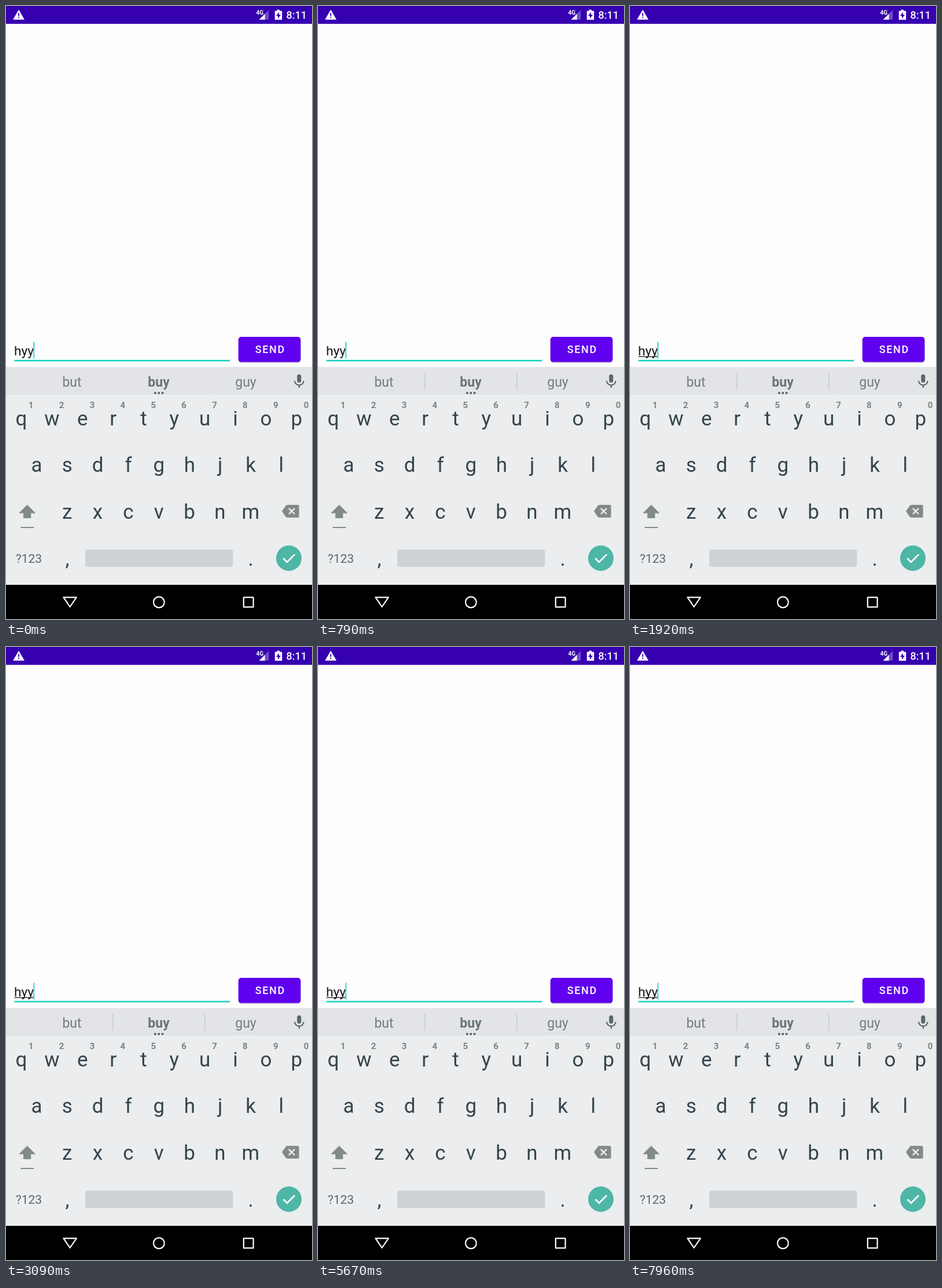
These frames come from a looping animation (529x1058 px, 8 s). An HTML page:

```html
<!DOCTYPE html>
<html lang="en">
<head>
<meta charset="utf-8">
<title>Message input</title>
<style>
  html, body { margin: 0; width: 100%; height: 100%; overflow: hidden; background: #fdfdfd; }
  svg { display: block; width: 100vw; height: 100vh; font-family: Roboto, sans-serif; }
  .key { font-size: 35px; fill: #34444c; text-anchor: middle; }
  .hint { font-size: 15px; font-weight: 700; fill: #7a8383; text-anchor: middle; }
  .word { font-size: 23px; fill: #717b7f; text-anchor: middle; }
  .word.best { font-weight: 700; fill: #69747a; }
  .nav { fill: none; stroke: #fff; stroke-width: 2.2; stroke-linejoin: round; }
  .composing { animation: compose 8s step-end infinite; }
  .dividers { animation: settle 8s step-end infinite; }
  @keyframes compose { 0% { opacity: 0; } 14.625%, 100% { opacity: 1; } }
  @keyframes settle { 0% { opacity: .12; } .5%, 100% { opacity: 1; } }
</style>
</head>
<body>
<svg viewBox="0 0 529 1058">
  <rect width="529" height="1058" fill="#fdfdfd"/>

  <!-- status bar -->
  <rect width="529" height="30.8" fill="#3600b0"/>
  <g fill="#fff">
    <path d="M22 6.6 L32 23.6 H12 Z"/>
    <path d="M21.1 12.3 h1.9 v5 h-1.9 z M21.1 18.8 h1.9 v2 h-1.9 z" fill="#3600b0"/>
    <text x="432.5" y="14.8" font-size="10" font-weight="700" textLength="">4G</text>
    <path d="M454.2 6.8 V23.4 H437.6 Z" opacity=".3"/>
    <path d="M447.6 13.4 V23.4 H437.6 Z"/>
    <path d="M468.3 6.6 h4.8 v1.8 h3.2 q.9 0 .9 .9 v13.6 q0 .9 -.9 .9 h-10.6 q-.9 0 -.9 -.9 v-13.6 q0 -.9 .9 -.9 h2.6 z"/>
    <path d="M471.9 10.4 L467 17 h3.1 v5 l4.9 -7 h-3.1 z" fill="#3600b0"/>
    <text x="484.6" y="22.2" font-size="18" font-weight="500">8:11</text>
  </g>

  <!-- message field -->
  <text x="14" y="603" font-size="22.8" fill="#171717">hyy</text>
  <rect class="composing" x="14.5" y="604.4" width="33.5" height="1.4" fill="#222"/>
  <rect x="47.4" y="579.5" width="1.7" height="29" fill="#19d3c3"/>
  <rect x="14.5" y="610.8" width="372.5" height="2.5" fill="#10d5c2"/>

  <!-- send button -->
  <rect x="402" y="572.6" width="107.5" height="43.4" rx="5" fill="#000" opacity=".16"/>
  <rect x="401.7" y="571" width="107.7" height="43.6" rx="5" fill="#5f00ee"/>
  <text x="430.8" y="599.4" font-size="18" font-weight="500" letter-spacing="1.6" fill="#fff">SEND</text>

  <!-- keyboard -->
  <rect y="623" width="529" height="376" fill="#ebedef"/>
  <rect y="623" width="529" height="48" fill="#e2e4e7"/>
  <rect y="671" width="529" height="1.2" fill="#f0f2f3"/>
  <text class="word" x="114" y="657">but</text>
  <text class="word best" x="264" y="657">buy</text>
  <text class="word" x="414.5" y="657">guy</text>
  <g fill="#566168">
    <circle cx="258" cy="668" r="2"/><circle cx="264.3" cy="668" r="2"/><circle cx="270.6" cy="668" r="2"/>
  </g>
  <path class="dividers" d="M185 633 V662 M343.7 633 V662" stroke="#c6cbd0" stroke-width="1.4"/>
  <g fill="none" stroke="#5b676d">
    <path d="M506.8 639.2 V646.4" stroke-width="7" stroke-linecap="round"/>
    <path d="M499 647 a7.8 7.4 0 0 0 15.6 0 M506.8 654 V659" stroke-width="2.2"/>
  </g>
  <g id="keys"></g>

  <g fill="#818b89">
    <path d="M36.6 860.8 L51.3 875.4 H43.2 V884 H30 V875.4 H22 Z"/>
    <rect x="25.5" y="899" width="22.6" height="2"/>
    <path d="M477 872 L483.6 862.4 Q484.7 861 486.4 861 H504.6 Q506.6 861 506.6 863 V881 Q506.6 883 504.6 883 H486.4 Q484.7 883 483.6 881.6 Z"/>
  </g>
  <path d="M488.8 866.8 l10.2 10.2 m0 -10.2 l-10.2 10.2" stroke="#eff1f2" stroke-width="2.4"/>
  <text x="16.8" y="960.8" font-size="21" fill="#59656b">?123</text>
  <rect x="137" y="938.2" width="255.4" height="29.8" rx="3" fill="#cdd2d6"/>
  <circle cx="489" cy="953" r="22" fill="#4db6a6"/>
  <path d="M479.3 953.2 l6.6 6.6 l13.2 -13.4" fill="none" stroke="#fff" stroke-width="2.8"/>

  <!-- navigation bar -->
  <rect y="999" width="529" height="59" fill="#000"/>
  <path class="nav" d="M99.4 1020.6 H121.8 L110.6 1037 Z"/>
  <circle class="nav" cx="264.4" cy="1029" r="9.4"/>
  <rect class="nav" x="410.8" y="1020.6" width="16.8" height="16.8" rx=".5"/>
</svg>
<script>
  const keys = document.getElementById('keys');
  const pitch = 52.86;

  function addText(cls, x, y, text) {
    const el = document.createElementNS('http://www.w3.org/2000/svg', 'text');
    el.setAttribute('class', cls);
    el.setAttribute('x', x);
    el.setAttribute('y', y);
    el.textContent = text;
    keys.append(el);
  }

  function addRow(cls, x, y, chars) {
    [...chars].forEach((c, i) => addText(cls, x + i * pitch, y, c));
  }

  addRow('hint', 43.3, 694, '1234567890');
  addRow('key', 26.5, 723.6, 'qwertyuiop');
  addRow('key', 53, 804, 'asdfghjkl');
  addRow('key', 105.6, 884.6, 'zxcvbnm');
  addText('key', 106, 966, ',');
  addText('key', 423, 966, '.');
</script>
</body>
</html>
```
